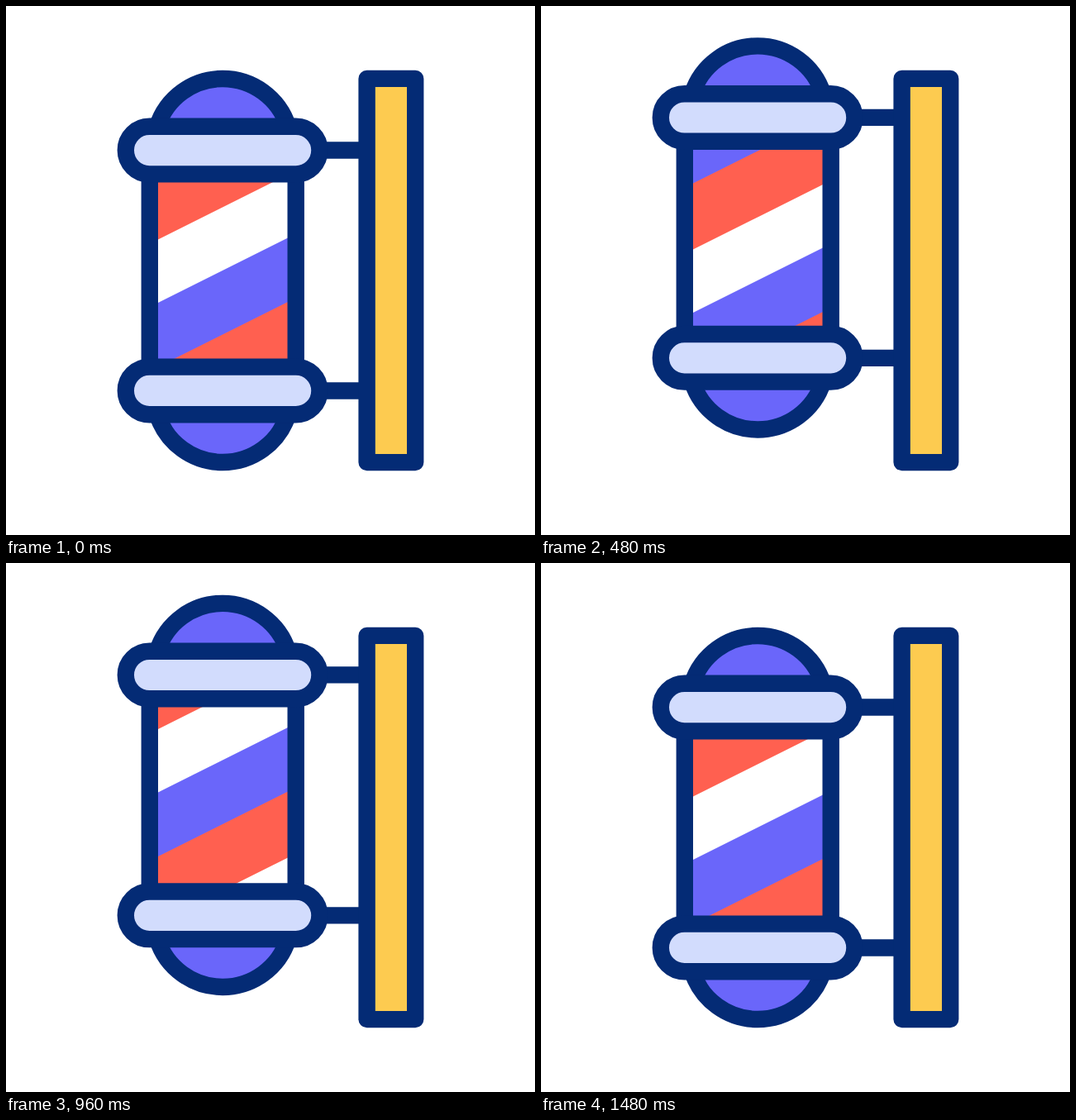
Recreate the animation shown at these times as an HTML page. Size 640 by 640 pixels, loop 1.52 s.

```html
<!DOCTYPE html>
<html lang="en">
<head>
<meta charset="utf-8">
<title>Barber pole</title>
<style>
  html, body { margin: 0; height: 100%; overflow: hidden; background: #fff; }
  svg { display: block; width: 100vw; height: 100vh; }
</style>
</head>
<body>
<svg viewBox="0 0 640 640" fill="none" stroke="#042b75" stroke-width="20.4" stroke-linejoin="round">
  <defs>
    <clipPath id="tube"><path d="M174 204H351V437H174Z"/></clipPath>
    <g id="end">
      <path d="M379 174.5H437"/>
      <path d="M183 145.8A83 83 0 0 1 341.2 145.8" fill="#6a66fa" stroke-linecap="round"/>
      <rect x="144.8" y="145.8" width="234.6" height="57.6" rx="28.8" fill="#d2dcfd"/>
    </g>
  </defs>
  <g id="pole">
    <g clip-path="url(#tube)" stroke="none"><g id="stripes"></g></g>
    <path d="M173.8 204V437M350.7 204V437"/>
    <use href="#end"/>
    <use href="#end" transform="matrix(1 0 0 -1 0 640)"/>
  </g>
  <rect x="436.6" y="87.9" width="58.6" height="464.2" fill="#fdcb50"/>
</svg>
<script>
const LOOP = 1520, STEP = 40, PERIOD = 234, LIFT = 51.6;
const pole = document.getElementById('pole');
const stripes = document.getElementById('stripes');

const stripe = (y, height, color) =>
  `<path fill="${color}" d="M174 ${y}l177 -88.5v${height}l-177 88.5z"/>`;

for (let k = -2; k < 2; k++) {
  const y = 207.5 + k * PERIOD;
  stripes.innerHTML += stripe(y, 80, '#ff6050') + stripe(y + 156.5, 78.5, '#6a66fa');
}

// Cubic-bezier ease (x1, 0, x2, 1) running from time a to time b.
function ease(t, a, b, x1, x2) {
  const u = Math.min(1, Math.max(0, (t - a) / (b - a)));
  let lo = 0, hi = 1;
  for (let i = 0; i < 30; i++) {
    const s = (lo + hi) / 2, r = 1 - s;
    if (3 * r * r * s * x1 + 3 * r * s * s * x2 + s * s * s < u) lo = s;
    else hi = s;
  }
  return lo * lo * (3 - 2 * lo);
}

function draw(now) {
  const t = Math.floor((now % LOOP) / STEP) * STEP;
  const lift = LIFT * (ease(t, 0, 690, 0.765, 0.49) - ease(t, 690, 1410, 0.52, 0.53));
  const roll = PERIOD * ease(t, 0, 1400, 0.49, 0.51);
  pole.setAttribute('transform', `translate(0 ${-lift})`);
  stripes.setAttribute('transform', `translate(0 ${roll})`);
}

function tick() {
  draw(performance.now());
  requestAnimationFrame(tick);
}
tick();
</script>
</body>
</html>
```
